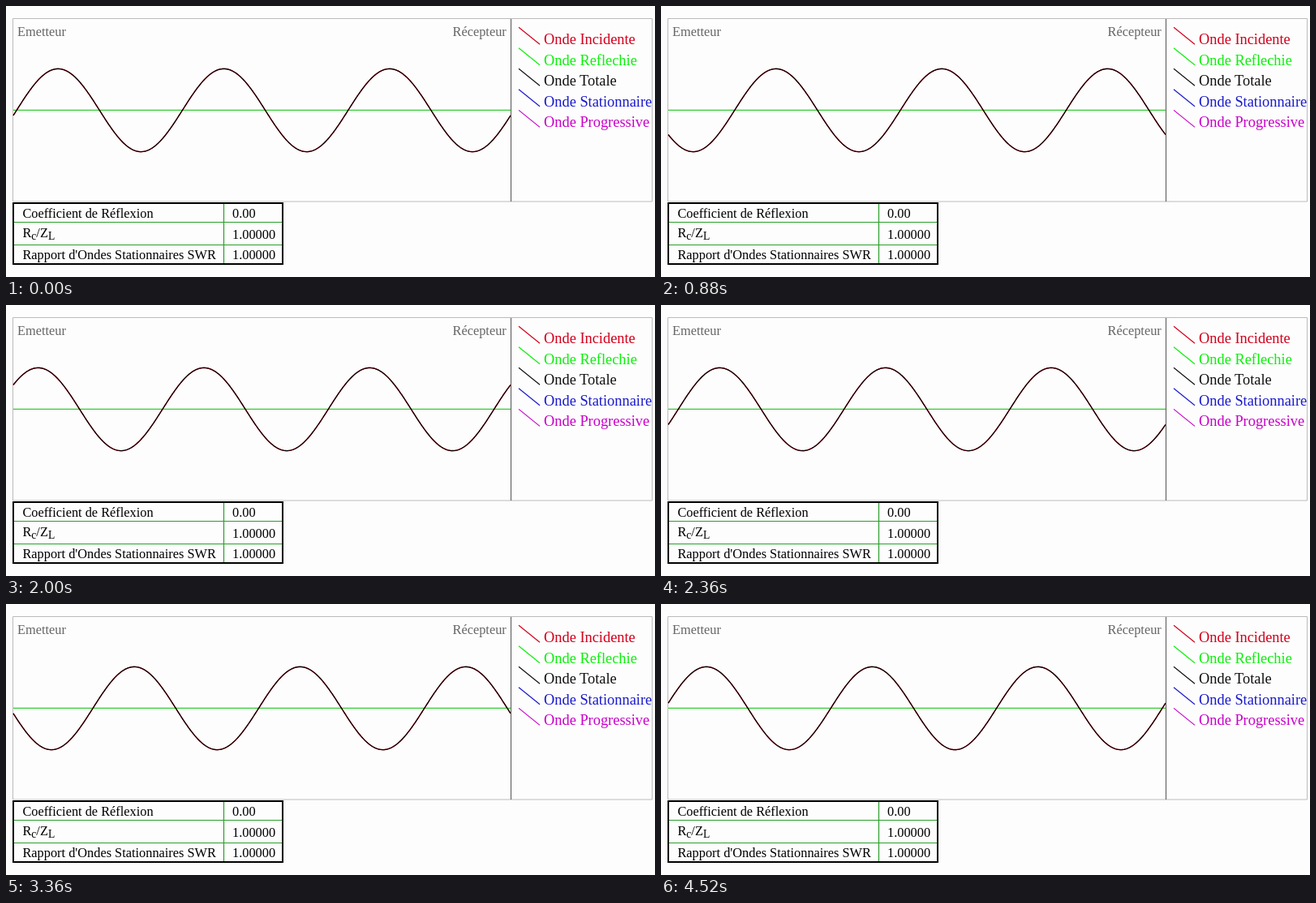
Animation of 800 by 334 pixels, one loop 4560 ms. Source, as an HTML page:

```html
<!DOCTYPE html>
<html lang="fr">
<head>
<meta charset="utf-8">
<style>
  html, body { margin: 0; width: 100%; height: 100%; overflow: hidden; background: #fdfdfd; }
  svg { display: block; width: 800px; height: 334px; font: 16.35px "Liberation Serif", "Times New Roman", serif; }
  path { fill: none; }
  .legend { font-size: 18.39px; }
  .sub { font-size: 13.6px; }
</style>
</head>
<body>
<svg viewBox="0 0 800 334">
  <path d="M8.5 15.5H796.5V241H8.5Z" stroke="#bbb"/>
  <path d="M9 128.4H622" stroke="#3c3" stroke-width="1.3"/>
  <path class="wave" stroke="#d4001c" stroke-width="1.4"/>
  <path class="wave" stroke="#000" stroke-width="1.2"/>
  <path d="M622.5 16V241" stroke="#666" stroke-width="1.2"/>
  <g fill="#666">
    <text x="14" y="37">Emetteur</text>
    <text x="550.5" y="37">Récepteur</text>
  </g>
  <g id="legend" class="legend"></g>

  <path d="M268.5 243V318M10 266.5H341M10 294.5H341" stroke="#2a9f2a" stroke-width="1.2"/>
  <path d="M9 243H341V318H9Z" stroke="#000" stroke-width="2"/>
  <text x="20.4" y="260.5">Coefficient de Réflexion</text>
  <text x="20.4" y="284.5">R<tspan class="sub" dy="3.5">c</tspan><tspan dy="-3.5">/Z</tspan><tspan class="sub" dy="3.5">L</tspan></text>
  <text x="20.4" y="312">Rapport d'Ondes Stationnaires SWR</text>
  <text x="279" y="260.5">0.00</text>
  <text x="279" y="286.5">1.00000</text>
  <text x="279" y="312">1.00000</text>
</svg>
<script>
const LOOP = 4560, TICK = 40, LEFT = 9, WIDTH = 613, MID = 128.5, AMP = 51.08;
const waves = document.querySelectorAll('.wave');

document.getElementById('legend').innerHTML = [
  ['Incidente', '#d4001c'], ['Reflechie', '#0bf00b'], ['Totale', '#111'],
  ['Stationnaire', '#1a1acc'], ['Progressive', '#c800c8']
].map(([name, color], i) => `<g transform="translate(0 ${i * 25.54})">
  <path d="M632 26.2L658 47.2" stroke="${color}" stroke-width="1.2"/>
  <text x="663" y="47" fill="${color}">Onde ${name}</text></g>`).join('');

// The wave advances in steps of 1/50 wavelength, at a slightly uneven pace: [tick, step]
const pace = [[0, 1], [10, 10], [34, 30], [50, 45], [68, 60], [84, 74], [113, 99], [114, 100]];

function stepAt(tick) {
  const i = pace.findIndex(([t]) => t > tick);
  const [t0, s0] = pace[i - 1], [t1, s1] = pace[i];
  return Math.round(s0 + (s1 - s0) * (tick - t0) / (t1 - t0));
}

function draw() {
  const step = stepAt(Math.floor(performance.now() % LOOP / TICK));
  const points = [];
  for (let x = 0; x <= WIDTH; x++) {
    const y = MID - AMP * Math.sin(2 * Math.PI * (3 * x / WIDTH - step / 50));
    points.push(`${LEFT + x} ${y.toFixed(2)}`);
  }
  waves.forEach(w => w.setAttribute('d', 'M' + points.join('L')));
  requestAnimationFrame(draw);
}
draw();
</script>
</body>
</html>
```
